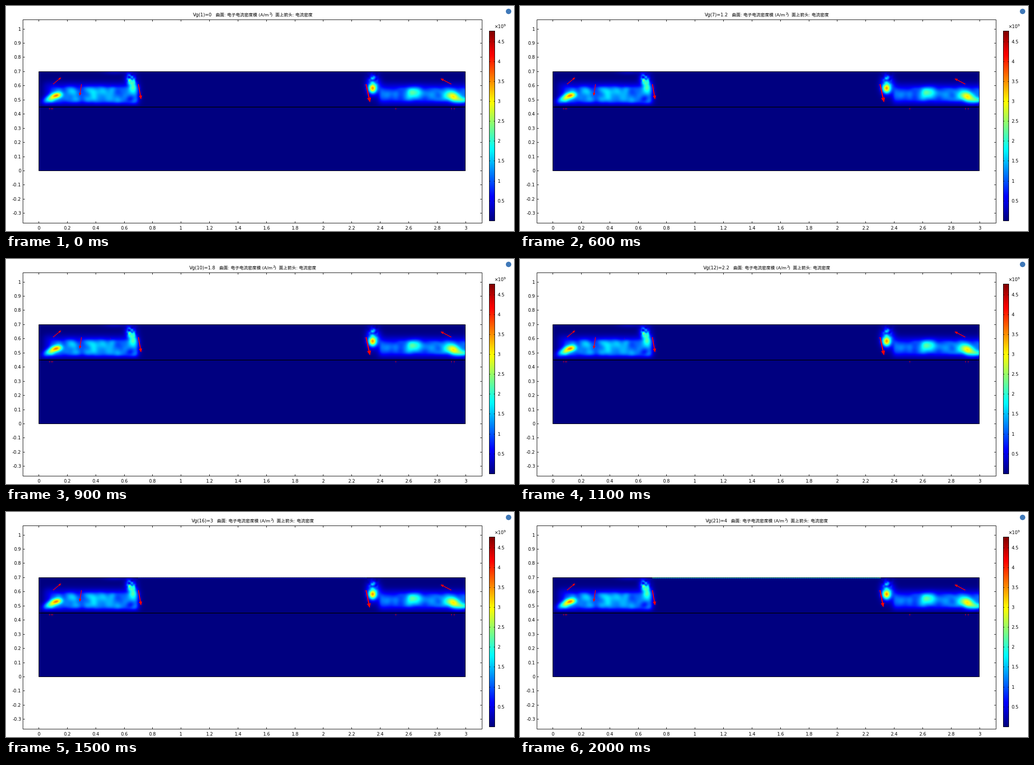
Write a matplotlib script that moves like this. It is 1122 px wide and 499 px high and loops after 2.1 s.

```python
import numpy as np
import matplotlib.pyplot as plt
from matplotlib.animation import FuncAnimation
from matplotlib.colors import LinearSegmentedColormap
from matplotlib.patches import Circle, Polygon, Rectangle

W, H, DPI = 1122, 499, 100
PX = 72 / DPI                       # one pixel in points
STEPS, INTERVAL = 21, 100
FONTS = ["DejaVu Sans", "Noto Sans CJK JP"]
VMAX = 4.77
RED = "#ff0000"
RAINBOW = LinearSegmentedColormap.from_list("rainbow", [
    (0, "#000080"), (0.125, "#0000ff"), (0.375, "#00ffff"),
    (0.625, "#ffff00"), (0.875, "#ff0000"), (1, "#800000")], N=512)

fig = plt.figure(figsize=(W / DPI, H / DPI), dpi=DPI, facecolor="white")
ax = fig.add_axes([0, 0, 1, 1])


def label(x, y, s, size=10, ha="left"):
    return ax.text(x, y, s, fontsize=size * PX, family=FONTS, ha=ha,
                   va="baseline", color="black", zorder=6)


def line(xs, ys, width=1):
    ax.plot(xs, ys, color="black", lw=width * PX, zorder=5,
            solid_capstyle="butt", snap=False)


def box(left, top, right, bottom):
    ax.add_patch(Rectangle((left, top), right - left, bottom - top, fill=False,
                           lw=PX, ec="black", zorder=4, snap=False))


def heat(data, left, top, right, bottom):
    return ax.imshow(data, cmap=RAINBOW, vmin=0, vmax=VMAX, aspect="auto",
                     extent=(left, right, bottom, top),
                     interpolation="nearest", zorder=2)


def to_x(v):
    return 72.5 + 314.17 * v


def to_y(v):
    return 365.5 - 314.5 * v


# ---- current density field ----
X0, X1, Y0, Y1 = 73, 1015, 146, 366
gx, gy = np.meshgrid(np.arange(X0, X1) + 0.5, np.arange(Y0, Y1) + 0.5)


def blob(x, y, sx, sy, amp, deg=0):
    c, s = np.cos(np.radians(deg)), np.sin(np.radians(deg))
    u = ((gx - x) * c + (gy - y) * s) / sx
    v = ((gy - y) * c - (gx - x) * s) / sy
    return amp * np.exp(-(u * u + v * v) / 2)


def step(d):
    return 1 / (1 + np.exp(-np.clip(d, -40, 40)))


def band(left, right, top, bottom, amp, soft):
    return (amp * step((gx - left) / soft) * step((right - gx) / soft)
            * step((gy - top) / soft) * step((bottom - gy) / soft))


def noise(seed, sigma):
    n = np.random.default_rng(seed).normal(size=gx.shape)
    k = np.exp(-0.5 * (np.arange(-3 * sigma, 3 * sigma + 1) / sigma) ** 2)
    for axis in (0, 1):
        n = np.apply_along_axis(np.convolve, axis, n, k, mode="same")
    return n / n.std()


# two uneven channels with a wide haze around them
field = band(98, 291, 180, 214, 0.75, 2.5) + band(826, 1030, 182, 211, 0.65, 2.5)
field *= 1 + 0.22 * noise(4, 6)
field += band(84, 295, 170, 220, 0.45, 4) + band(822, 1040, 172, 219, 0.45, 4)

# crowding at the contacts and at the bends
field += blob(113, 198, 8, 4.5, 1.9, -10) + blob(98, 205, 12, 5.5, 1.6, -25)
field += blob(205, 190, 16, 8, 0.4) + blob(150, 189, 10, 8, 0.3)
field += blob(279, 174, 11, 6, 1.6, 65) + blob(277, 160, 9, 9, 0.7)
field += blob(809.5, 183, 6, 7, 2.3) + blob(811, 175, 10, 15, 1.3)
field += blob(899, 191, 13, 8, 1.0, -10) + blob(987, 201, 13, 8, 1.7, 30)
field += blob(1012, 209, 9, 4.5, 0.8) + blob(240, 147, 18, 4, 0.25)

speckle = blob(278, 157, 9, 9, 1) + blob(811, 155, 10, 9, 1)
field *= 1 + 0.4 * speckle * noise(9, 2)
field *= step(222 - gy)
field = np.clip(field, 0, VMAX)
img = heat(field, X0, Y0, X1, Y1)

# bright channel along the upper edge
cols = np.arange(X0, X1)
inside = (cols >= 292) & (cols < 797)
ends = np.exp(-np.minimum(abs(cols - 292), abs(cols - 796)) / 4)
channel = inside * (1 + 0.4 * ends + 0.12 * np.sin(cols * 1.3))

box(72.5, 145.5, 1014.5, 365.5)
line([72.5, 1014.5], [224.2] * 2, 1.5)

# ---- plot frame and ticks ----
L, R, T, B, TICK = 37.5, 1051.5, 30.5, 481.5, 4
box(L, T, R, B)
for v in np.arange(16) / 5:
    x = np.floor(to_x(v)) + 0.5
    line([x, x], [T, T + TICK])
    line([x, x], [B, B - TICK])
    label(x, 495.5, f"{v:.2g}", ha="center")
for v in np.arange(-3, 11) / 10:
    y = np.floor(to_y(v)) + 0.5
    line([L, L + TICK], [y, y])
    line([R, R - TICK], [y, y])
    label(33.5, y + 3.8, f"{v:g}", ha="right")

# ---- colour bar ----
heat(np.linspace(VMAX, 0, 421)[:, None], 1068, 55, 1080, 476)
box(1067.5, 55.5, 1079.5, 476.5)
for i in range(1, 10):
    y = np.floor(476.2 - 44.1 * i) + 0.5
    line([1067.5, 1069.5], [y, y])
    line([1077.5, 1079.5], [y, y])
    label(1085.5, y + 3.8, f"{i / 2:g}")
label(1078.5, 48.5, "×10")
label(1098.5, 45, "9", 7.5)

ax.add_patch(Circle((1110, 12), 6, color="#3f78b8", lw=0, zorder=5))


# ---- arrows, scaled by their length, on a regular grid ----
def arrow_shape(x, dx, dy):
    size = np.hypot(dx, dy)
    d = np.array([dx, dy]) / size
    n = np.array([-d[1], d[0]]) * size
    a = np.array([to_x(x), to_y(0.611)])
    b = a + d * size
    neck = b - d * size * 0.25
    return [a + n * 0.03, neck + n * 0.03, neck + n * 0.108, b,
            neck - n * 0.108, neck - n * 0.03, a - n * 0.03]


def arrow(*spec):
    return ax.add_patch(Polygon(arrow_shape(*spec), color=RED, lw=0, zorder=7))


arrow(0.1, 18, -15)
arrow(0.3, -4, 26)
arrow(0.7, 6, 34)
arrow(2.9, -24, -12.5)
pull = arrow(2.3, 9, 40.5)


def speck(x, y, w):
    return ax.add_patch(Rectangle((to_x(x) - w / 2, to_y(y) - 0.6), w, 1.3,
                                  color=RED, lw=0, alpha=0.75, zorder=7))


for x in (0.075, 0.087, 0.098, 2.51, 2.9, 2.92):
    speck(x, 0.437, 2)
fading = speck(0.503, 0.601, 1.5)

# ---- title ----
BASE = 22.8
head = label(0, BASE, "")
tail = [
    (463, label(0, BASE, "曲面: 电子电流密度模 (A/m", 9.5)),
    (581.2, label(0, BASE - 3.6, "2", 7.5)),
    (584.8, label(0, BASE, ")  面上箭头: 电流密度", 9.5)),
]


def extra_width(s):
    """Pixels by which the heading is longer than its first form."""
    return 6.36 * (len(s) - 7) - 3.18 * s.count(".")


def draw(i):
    vg = i * 0.2
    s = f"Vg({i + 1})={vg:.2g}"
    shift = extra_width(s) / 2
    head.set_text(s)
    head.set_x(413 - shift)
    for x, t in tail:
        t.set_x(x + shift)

    data = field.copy()
    glow = max(0, vg - 2.4) * 1.05
    data[0] = np.maximum(data[0], glow * channel)
    img.set_data(data)

    drop = max(0, vg - 2.2) / 1.8
    pull.set_xy(arrow_shape(2.3, 9 - 1.5 * drop, 40.5 - 2.5 * drop))
    near = 0.35 + 0.5 * np.exp(-((vg - 2) / 0.5) ** 2)
    fading.set_alpha(near if vg < 2.6 else 0)
    return [head, img, pull, fading, *(t for _, t in tail)]


ax.set_xlim(0, W)
ax.set_ylim(H, 0)
ax.axis("off")

anim = FuncAnimation(fig, draw, frames=STEPS, interval=INTERVAL,
                     repeat=True, repeat_delay=0, blit=False)
plt.show()
```
